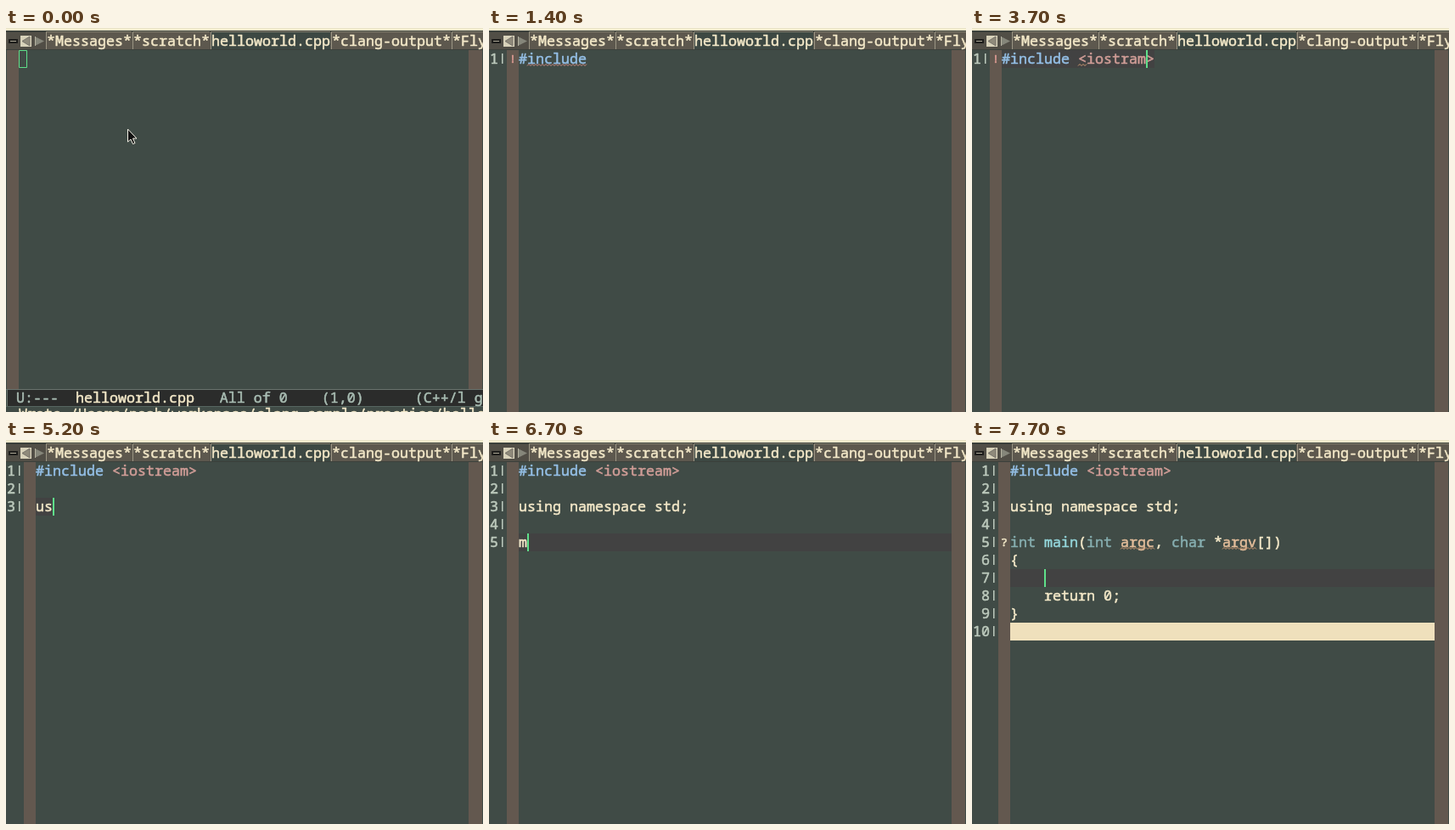
These frames come from a looping animation (562 px wide and 452 px high, 8 s). An HTML page with a canvas:

```html
<!DOCTYPE html>
<html lang="en">
<head>
<meta charset="utf-8">
<title>Editor typing</title>
<style>
html, body { margin: 0; width: 562px; height: 452px; overflow: hidden; background: #404b46; }
canvas { display: block; }
</style>
</head>
<body>
<canvas id="stage" width="562" height="452"></canvas>
<script>
const ctx = document.getElementById('stage').getContext('2d');
const LOOP = 8000, CELL = 10, ROW = 21, TOP = 26, RIGHT = 545;
const FONT = '"Noto Sans Mono", "DejaVu Sans Mono", monospace';
const BG = '#404b46', FRINGE = '#63584f', CREAM = '#f3e8c8', HL = '#424242',
      GREEN = '#5fe08a', RED = '#cf8a80', ORANGE = '#d09a72';

const INC = '#include', STREAM = '#include <iostream>', USING = 'using namespace std;';
const head = [STREAM, '', USING];
const program = [...head, '', 'int main(int argc, char *argv[])', '{', '', '    return 0;', '}', ''];

// A step: time, lines, cursor row, cursor column (-1 hides it), right edge of the current-line bar, extras.
const steps = [];
const add = (time, lines, row, col, bar = RIGHT, extra = {}) =>
  steps.push({ time, lines, row, col, bar, ...extra });
// Types one text per 100 ms on the last line.
const type = (time, before, texts, bar, extra) => texts.forEach((text, i) =>
  add(time + i * 100, [...before, text], before.length, text.replace('>', '').length, bar, extra));

const wrongInc = { mark: '!', waves: [[0, 1, 8, RED]] };
const wrongFile = { mark: '!', waves: [[0, 9, 10, ORANGE]] };

add(400, [''], 0, 0);
type(500, [], ['#']);
type(700, [], ['#in']);
type(900, [], ['#inc', '#inclu', '#includ', INC]);
add(1400, [INC], 0, -1, 0, wrongInc);
add(1500, [INC], 0, 8, RIGHT, wrongInc);
type(1700, [], [INC + ' <>', INC + ' <i>'], RIGHT, wrongFile);
type(2700, [], [INC + ' <ios>'], RIGHT, wrongFile);
type(2900, [], [INC + ' <iost>'], RIGHT, wrongFile);
type(3100, [], [INC + ' <iostr>', INC + ' <iostra>'], RIGHT, wrongFile);
add(3300, [INC + ' <iostram>'], 0, -1, 0, wrongFile);
[17, 16, 15].forEach((col, i) => add(3700 + i * 100, [INC + ' <iostram>'], 0, col, 215, wrongFile));
[16, 17, 18, 19].forEach((col, i) => add(4000 + i * 100, [STREAM], 0, col, 225, wrongFile));
add(4400, [STREAM], 0, 19, 225);
add(4800, [STREAM, ''], 1, 0, 0);
type(4900, [STREAM, ''], ['', ''], 37);
type(5100, [STREAM, ''], ['u', 'us'], 57);
add(5300, [STREAM, '', 'us'], 2, 2, RIGHT, { popup: [3, 9] });
const field = { select: [2, 16, 19] };
const wrongUsing = { ...field, mark: '!', waves: [[2, -3.4, -1.4, RED], [2, 0, 5, RED]] };
add(5400, head, 2, 16, RIGHT, field);
add(5500, head, 2, 16, RIGHT, wrongUsing);
add(5700, head, 2, 16, RIGHT, field);
add(6100, head, 2, 20);
add(6200, [...head, ''], 3, 0);
type(6300, [...head, ''], ['']);
type(6700, [...head, ''], ['m', 'ma', 'mai', 'main']);
add(7100, [...head, '', 'main'], 4, 4, RIGHT, { popup: [5, 10] });
add(7400, program, 6, 4, RIGHT, { popup: [9, 1] });
add(7600, program, 6, 4, RIGHT, {
  popup: [9, 1], mark: '?', markRow: 4, waves: [[4, 13, 17, ORANGE], [4, 25, 29, ORANGE]]
});

function rect(x, y, w, h, color) {
  ctx.fillStyle = color;
  ctx.fillRect(x, y, w, h);
}

// A thin outline gives the medium weight of the editor font.
function text(str, x, y, color, size = 16.667) {
  ctx.font = `${size}px ${FONT}`;
  ctx.fillStyle = ctx.strokeStyle = color;
  ctx.lineWidth = 0.55;
  ctx.lineJoin = 'round';
  ctx.fillText(str, x, y);
  ctx.strokeText(str, x, y);
}

function polygon(points, fill, stroke) {
  ctx.beginPath();
  points.forEach(([x, y]) => ctx.lineTo(x, y));
  ctx.closePath();
  ctx.fillStyle = fill;
  ctx.fill();
  if (stroke) {
    ctx.strokeStyle = stroke;
    ctx.lineWidth = 1;
    ctx.stroke();
  }
}

function wave(x0, x1, y, color) {
  ctx.beginPath();
  for (let x = x0, up = 0; x <= x1; x += 2, up ^= 1) ctx.lineTo(x, y + (up ? 0 : 2));
  ctx.strokeStyle = color;
  ctx.lineWidth = 1;
  ctx.stroke();
}

function drawTabs() {
  rect(0, 0, 562, 3, '#eee8cb');
  rect(0, 3, 562, 23, '#3b403b');
  rect(0, 5, 562, 20, '#5d584e');
  rect(1, 5, 46, 20, '#514e46');
  rect(3, 13, 11, 5, '#1d1d1b');
  rect(5, 15, 7, 1, '#aaa594');
  rect(17, 9, 13, 13, '#d8d2ba');
  polygon([[28, 10], [19, 15.5], [28, 21]], '#8f8a7b', '#77736a');
  polygon([[34, 10], [45, 15.5], [34, 21]], '#85867a');
  rect(34, 10, 1, 11, '#b5b2a0');
  const tabs = [[47, '*Messages*'], [149, '*scratch*'], [241, 'helloworld.cpp'],
                [383, '*clang-output*'], [525, '*Fly']];
  tabs.forEach(([x, name], i) => {
    const w = name.length * CELL + 1;
    if (i === 2) rect(x, 4, w, 21, '#3d4843');
    rect(x, 5, 1, 20, '#9a9584');
    rect(x, 4, w, 1, '#85806f');
    text(name, x + 1, 21, CREAM);
  });
}

function drawIntro() {
  rect(1, TOP, 14, 400, FRINGE);
  rect(RIGHT, TOP, 16, 400, FRINGE);
  ctx.strokeStyle = GREEN;
  ctx.lineWidth = 1;
  ctx.strokeRect(15.5, 26.5, 9, 20);
  rect(0, 425, 562, 1, '#69736d');
  rect(1, 426, 561, 19, '#2b2c2b');
  rect(1, 426, 1, 19, '#69736d');
  rect(0, 445, 562, 1, '#566660');
  text(' U:---                   All of 0    (1,0)      (C++/l g', 2, 441, '#a9bdb3');
  text('helloworld.cpp', 82, 441, CREAM);
  text('Wrote /Users/noah/workspace/clang-sample/practice/hello', 15, 460, CREAM);
  polygon([[143.5, 119], [143.5, 134], [147, 131], [149.5, 136.5], [152, 135.5],
           [149.5, 130], [154, 130]], '#111', '#f4f1e6');
}

function tokenColor(token) {
  if (token.startsWith('#')) return '#94bfe6';
  if (token.startsWith('<')) return '#d09d97';
  if (/^(int|char)$/.test(token)) return '#86aeb0';
  if (/^arg[cv]$/.test(token)) return '#e3bd9a';
  if (token === 'main(') return '#93d5da';
  return CREAM;
}

function drawCode(s) {
  const digits = String(s.lines.length).length;
  const left = 25 + digits * CELL;
  const rowY = row => TOP + row * ROW;
  const colX = col => left + col * CELL;

  rect(left - 14, TOP, 14, 426, FRINGE);
  rect(RIGHT, TOP, 16, 426, FRINGE);
  if (s.bar) rect(left, rowY(s.row), s.bar - left, ROW, HL);
  if (s.select) {
    const [row, from, to] = s.select;
    rect(colX(from), rowY(row), (to - from) * CELL, ROW, '#756f69');
  }
  if (s.popup) rect(left, rowY(s.popup[0]), RIGHT - left, s.popup[1] * ROW, '#efe0bc');

  s.lines.forEach((line, row) => {
    const y = rowY(row) + 16;
    text(String(row + 1).padStart(digits), 1, y, '#bdcabd');
    rect(left - 20, y - 12, 1.5, 12, '#bdcabd');
    for (const m of line.matchAll(/#\w*|<\w*>|main\(|\w+|[^\s\w]/g)) {
      const call = m[0] === 'main(';
      text(call ? 'main' : m[0], colX(m.index), y, tokenColor(m[0]));
      if (call) text('(', colX(m.index + 4), y, CREAM);
    }
  });

  for (const [row, from, to, color] of s.waves || [])
    wave(colX(from), colX(to), rowY(row) + 16.5, color);
  if (s.mark) {
    const row = s.markRow ?? s.row;
    text(s.mark, left - 11, rowY(row) + 15, s.mark === '!' ? '#df9c94' : CREAM, 13);
  }
  if (s.col >= 0) rect(colX(s.col), rowY(s.row), 2, ROW, GREEN);
}

function draw() {
  const t = performance.now() % LOOP;
  const step = steps.findLast(s => s.time <= t);
  rect(0, 0, 562, 452, BG);
  if (step) drawCode(step);
  else drawIntro();
  drawTabs();
  requestAnimationFrame(draw);
}
draw();
</script>
</body>
</html>
```
